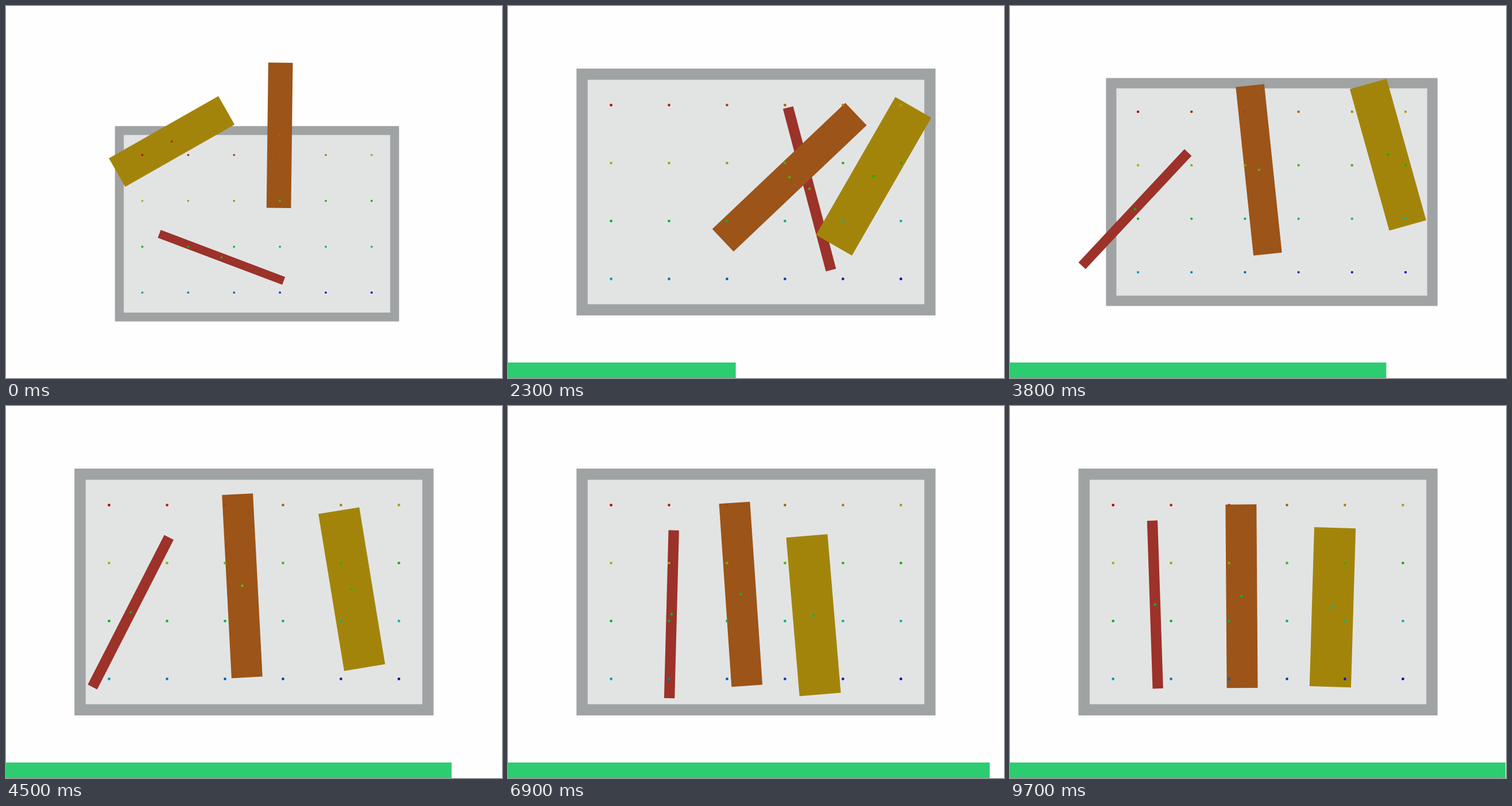
An HTML page with a canvas for the animation above (9800 ms loop, 864 by 648 pixels).

```html
<!DOCTYPE html>
<html>
<head>
<meta charset="utf-8">
<style>
  html, body { margin: 0; width: 100%; height: 100%; overflow: hidden; background: #fefefe; }
  canvas { display: block; }
</style>
</head>
<body>
<canvas id="stage" width="864" height="648"></canvas>
<script>
const ctx = document.getElementById('stage').getContext('2d');
const W = 864, H = 648, STEP = 100, STEPS = 98;
const TRAY = { w: 640, h: 440, wall: 20 };
const PITCH = 103.3;

// Steps at which the pieces pass their key poses [x, y, degrees] from the tray centre.
const KEYS = [0, 16, 29, 38, 55, 69, 97];
const pieces = [
  { w: 18.8, h: 299.5, color: '#9c3229', path: [
    [-80, 75.6, -69.3], [112, 101, -45], [42.3, -74.3, -1.5], [-264, 33, 43.1],
    [-176, 50.4, 6.4], [-150.5, 39.6, 1.5], [-183.4, 22.4, -1.9]] },
  { w: 55.2, h: 327, color: '#9c5418', path: [
    [51, -199.3, 0.7], [100, -153.5, 31.7], [-30, 91, 66.1], [-25, -42.8, -6],
    [-3.3, 34, -3.4], [-27.2, 4, -3.9], [-29.2, 7.5, -0.4]] },
  { w: 73.9, h: 283.5, color: '#a3840b', path: [
    [-192, -185.5, 60.4], [300.3, -200.3, 45], [144.7, 106.3, 7.5], [224.3, -72, -15.6],
    [121.6, 77.3, 1.6], [102.5, 41.3, -4.8], [133, 27.2, 1.7]] }
];

const slots = Array.from({ length: 24 }, (_, i) => ({
  x: (i % 6 - 2.5) * PITCH,
  y: (Math.floor(i / 6) - 1.5) * PITCH,
  color: `hsl(${i / 23 * 240}, 100%, 35%)`
}));

function noise(seed) {
  const v = Math.sin(seed * 127.1 + 11.7) * 43758.5453;
  return (v - Math.floor(v)) * 2 - 1;
}

// Random steps around the path shrink as the search cools down.
function poseAt(piece, index, step) {
  const k = KEYS.findLastIndex((key, i) => key <= step && i < KEYS.length - 1);
  const u = (step - KEYS[k]) / (KEYS[k + 1] - KEYS[k]);
  const heat = Math.max(3, 50 * (1 - step / 58)) * Math.sin(Math.PI * u);
  const [x, y, degrees] = piece.path[k].map((from, n) =>
    from + (piece.path[k + 1][n] - from) * u + noise(step * 9 + index * 3 + n) * heat / (n + 1));
  return { x, y, angle: degrees * Math.PI / 180 };
}

function halfExtent(piece, angle) {
  const c = Math.abs(Math.cos(angle)), s = Math.abs(Math.sin(angle));
  return { x: (piece.w * c + piece.h * s) / 2, y: (piece.w * s + piece.h * c) / 2 };
}

// Centres and scales the view so that the tray and all pieces fit.
function fitView(poses) {
  let right = TRAY.w / 2, left = -right, bottom = TRAY.h / 2, top = -bottom;
  poses.forEach((p, i) => {
    const e = halfExtent(pieces[i], p.angle);
    left = Math.min(left, p.x - e.x);
    right = Math.max(right, p.x + e.x);
    top = Math.min(top, p.y - e.y);
    bottom = Math.max(bottom, p.y + e.y);
  });
  const scale = Math.min(625.5 / (right - left), 451 / (bottom - top));
  ctx.translate(W / 2, H / 2);
  ctx.scale(scale, scale);
  ctx.translate(-(left + right) / 2, -(top + bottom) / 2);
}

function box(w, h, color) {
  ctx.fillStyle = color;
  ctx.fillRect(-w / 2, -h / 2, w, h);
}

function dot({ x, y }, color) {
  ctx.fillStyle = color;
  ctx.beginPath();
  ctx.arc(x, y, 2.4, 0, 2 * Math.PI);
  ctx.fill();
}

function nearestSlot(p) {
  const dist = s => Math.hypot(s.x - p.x, s.y - p.y);
  return slots.reduce((best, s) => dist(s) < dist(best) ? s : best);
}

function draw(step) {
  const poses = pieces.map((piece, i) => poseAt(piece, i, step));
  ctx.fillStyle = '#fefefe';
  ctx.fillRect(0, 0, W, H);

  ctx.save();
  fitView(poses);
  box(TRAY.w, TRAY.h, '#a0a3a3');
  box(TRAY.w - 2 * TRAY.wall, TRAY.h - 2 * TRAY.wall, '#e2e4e4');
  poses.forEach((p, i) => {
    ctx.save();
    ctx.translate(p.x, p.y);
    ctx.rotate(p.angle);
    box(pieces[i].w, pieces[i].h, pieces[i].color);
    ctx.restore();
  });
  slots.forEach(s => dot(s, s.color));
  poses.forEach(p => dot(p, nearestSlot(p).color));
  ctx.restore();

  // The progress bar runs fast at first, then slows down for the last part.
  ctx.fillStyle = '#2ecc71';
  ctx.fillRect(0, 621, Math.min(17.25 * step, W - 0.857 * (STEPS - step)), 27);
}

const start = performance.now();
function tick() {
  const time = Math.max(0, performance.now() - start);
  draw(Math.floor(time / STEP) % STEPS);
  requestAnimationFrame(tick);
}
tick();
</script>
</body>
</html>
```
